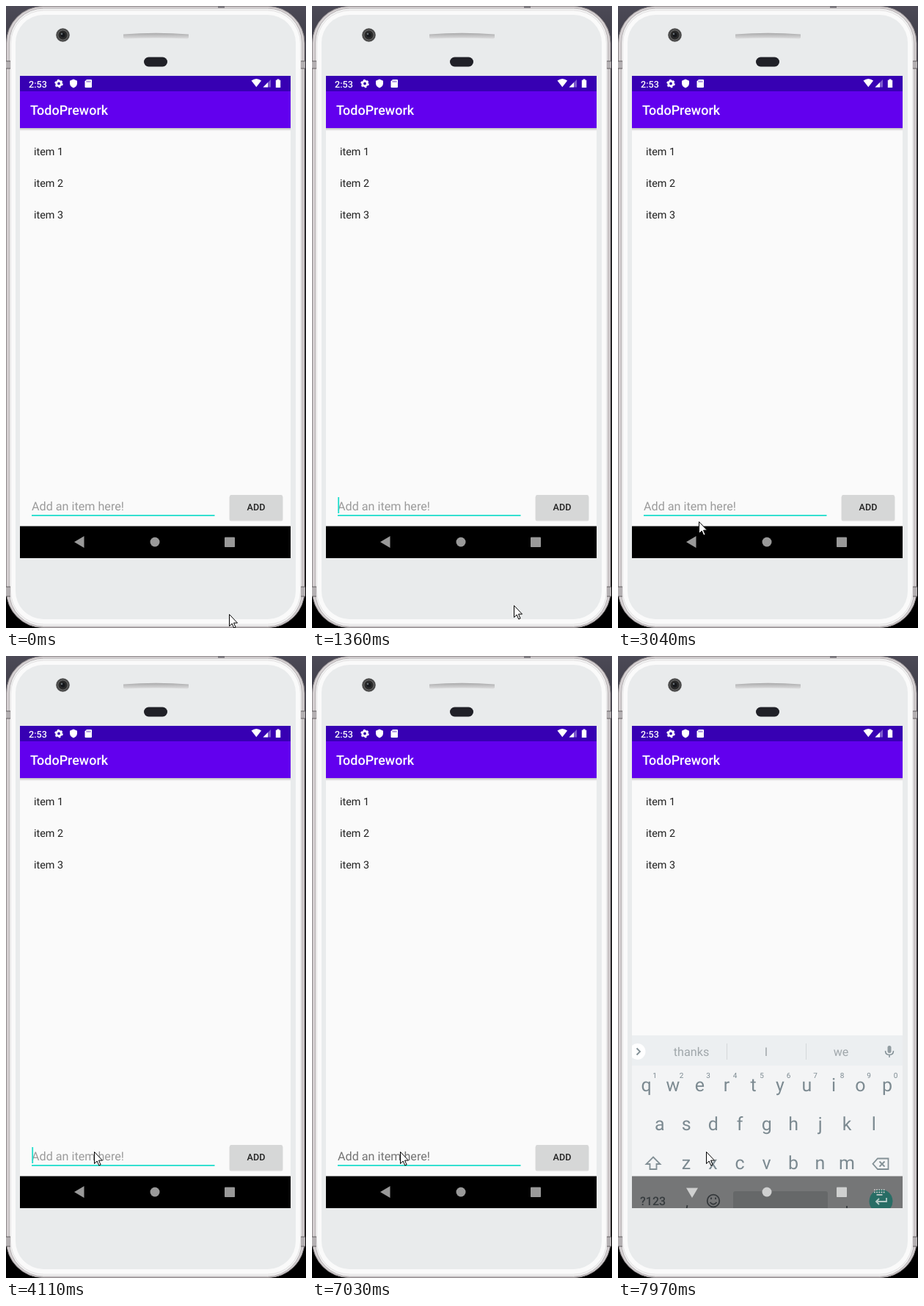
An HTML page for the animation above (8000 ms loop, 409 by 846 pixels).

```html
<!DOCTYPE html>
<html lang="en">
<head>
<meta charset="utf-8">
<title>Todo list on a phone</title>
<style>
  html, body { margin: 0; width: 100%; height: 100%; overflow: hidden; background: #000; }
  svg { display: block; width: 409px; height: 846px; font-family: Roboto, sans-serif; }
  text { text-rendering: geometricPrecision; }
  .mid { text-anchor: middle; }
  .medium { font-weight: 500; }
  .line { fill: none; stroke: #839096; stroke-width: 1.8; }
</style>
</head>
<body>
<svg viewBox="0 0 409 846" xmlns="http://www.w3.org/2000/svg">
  <defs>
    <linearGradient id="backdrop" x2="0" y2="1">
      <stop offset="0" stop-color="#4c4a56"/>
      <stop offset=".08" stop-color="#3a3943"/>
      <stop offset=".2" stop-color="#141418"/>
      <stop offset="1" stop-color="#000"/>
    </linearGradient>
    <linearGradient id="drop" x2="0" y2="1">
      <stop offset="0" stop-color="#000" stop-opacity=".24"/>
      <stop offset="1" stop-color="#000" stop-opacity="0"/>
    </linearGradient>
    <linearGradient id="grill" x2="0" y2="1">
      <stop offset="0" stop-color="#a9a9aa"/>
      <stop offset=".45" stop-color="#c2c2c3"/>
      <stop offset="1" stop-color="#dededf"/>
    </linearGradient>
    <clipPath id="screen"><rect x="19" y="95" width="369" height="656"/></clipPath>
  </defs>

  <rect width="409" height="846" fill="url(#backdrop)"/>

  <!-- phone body -->
  <rect x=".5" y=".5" width="406.500" height="845" rx="50" fill="#d5d0d2" stroke="#8f8a8c"/>
  <rect x="289" width="9" height="3" fill="#77747a"/>
  <rect x="4.500" y="3" width="399" height="841" rx="47" fill="#f1f1f1" stroke="#b5b0b2"/>
  <rect x="6.500" y="6" width="395" height="835" rx="45" fill="#fafafa" stroke="#e4e2e3"/>
  <rect x="13" y="12" width="382" height="822" rx="38" fill="#e9ebec"/>
  <g fill="#b4b0b2">
    <path d="M0 75h6v10H0zM402 75h6v10h-6zM0 790h6v13H0zM402 790h6v13h-6z"/>
    <path d="M0 75h6M0 85h6M402 75h6M402 85h6M0 790h6M0 803h6M402 790h6M402 803h6" stroke="#625e60"/>
  </g>

  <circle cx="77.500" cy="39.500" r="9.300" fill="#4b4b4b"/>
  <circle cx="77.500" cy="39.500" r="6.500" fill="#292929" stroke="#737373" stroke-width=".8"/>
  <circle cx="77.500" cy="39.500" r="3" fill="#15171b"/>
  <circle cx="76" cy="38" r="1.200" fill="#6c7479"/>
  <path d="M160 38.500q44.500-3.500 89 0v4q0 2-3 2-41.500-2-83 0-3 0-3-2z" fill="url(#grill)"/>
  <rect x="188" y="69.500" width="32" height="13" rx="6.500" fill="#202027"/>

  <g clip-path="url(#screen)">
    <rect x="19" y="95" width="369" height="656" fill="#fafafa"/>
    <rect x="19" y="166" width="369" height="4" fill="url(#drop)"/>
    <rect x="19" y="116" width="369" height="50" fill="#6200ee"/>
    <rect x="19" y="95" width="369" height="21" fill="#3700b3"/>

    <!-- status bar -->
    <g fill="#fff">
      <text class="medium" x="31" y="110.500" font-size="12.600">2:53</text>
      <circle cx="72" cy="105.500" r="3.300" fill="none" stroke="#fff" stroke-width="2.800"/>
      <circle cx="72" cy="105.500" r="4.900" fill="none" stroke="#fff" stroke-width="1.800" stroke-dasharray="2.566"/>
      <path d="M92 99.500l5 2.200v3.300q0 4.500-5 6.500-5-2-5-6.500v-3.300z"/>
      <path d="M110 100h6q1 0 1 1v9q0 1-1 1h-7.500q-1 0-1-1v-7.500z"/>
      <path d="M334.500 101.500q6.800-5 13.600 0l-6.800 8.700z"/>
      <path d="M361 100v10.500h-10.500z" opacity=".35"/>
      <path d="M357 104v6.500h-6.500z"/>
      <path d="M369.500 99.500h3v1.200h1.700v10.300h-6.400v-10.300h1.700z"/>
    </g>
    <path d="M110.500 101.500v2.300M112.500 101.500v2.300M114.500 101.500v2.300" stroke="#3700b3" stroke-width=".8"/>

    <text class="medium" x="33" y="148" font-size="17.960" fill="#fff">TodoPrework</text>
    <g font-size="14.370" fill="#212121">
      <text x="38" y="202.500">item 1</text>
      <text x="38" y="245.500">item 2</text>
      <text x="38" y="288.500">item 3</text>
    </g>

    <!-- entry row -->
    <text id="hint" x="35" y="686" font-size="16.170">Add an item here!</text>
    <rect x="35" y="692" width="249.500" height="1.800" fill="#20ddcc"/>
    <rect id="caret" x="35.300" y="668" width="1.800" height="22" fill="#20ddcc"/>
    <rect x="304.500" y="666" width="73" height="34.500" rx="2.500" fill="#000" opacity=".13"/>
    <rect x="305" y="665" width="72" height="34" rx="2" fill="#d6d7d7"/>
    <text class="mid medium" x="341" y="686" font-size="12.570" fill="#212121">ADD</text>

    <rect x="19" y="707.500" width="369" height="43.500" fill="#000"/>

    <!-- keyboard -->
    <g id="keyboard">
      <rect x="19" y="516" width="369" height="41" fill="#eceff1"/>
      <rect x="19" y="557" width="369" height="151" fill="#f3f4f5"/>
      <rect x="19" y="707.500" width="369" height="43.500" fill="#757677"/>
      <circle cx="26.500" cy="538" r="11" fill="#fff"/>
      <path class="line" d="M25.500 533.500l4.500 4.500-4.500 4.500"/>
      <path d="M148.500 527v22M256.500 527v22" stroke="#d4d8da"/>
      <g class="mid" font-size="16.200" fill="#a0a7ab">
        <text x="100" y="544">thanks</text>
        <text x="202" y="544">I</text>
        <text x="304" y="544">we</text>
      </g>
      <rect x="367.500" y="530" width="5" height="10" rx="2.500" fill="#929da2"/>
      <path class="line" style="stroke-width:1.500" d="M364.500 537q0 5.500 5.500 5.500t5.500-5.500M370 542.500v3.500"/>
      <g id="keys" class="mid" fill="#7c8a91"></g>
      <path class="line" d="M48 681.500l9.500 9.500h-5v7h-9v-7h-5z"/>
      <path class="line" d="M354 683.500h14.500v14.500h-14.500l-6.500-7.250zM356.500 687.500l7 7M363.500 687.500l-7 7"/>
      <text class="medium" x="30" y="746.500" font-size="16" fill="#373c3f">?123</text>
      <g fill="none" stroke="#35393c" stroke-width="1.800">
        <circle cx="130" cy="741" r="8.300"/>
        <path d="M125.500 743q4.500 5.500 9 0M127 736.500v2.500M133 736.500v2.500"/>
        <path d="M94.500 747l-1 5M312 748v3"/>
      </g>
      <rect x="157" y="728" width="129" height="32" rx="3" fill="#666869"/>
      <circle cx="358.500" cy="741.500" r="16" fill="#286d65"/>
      <path d="M366 737v5h-14M356 738l-4 4 4 4" fill="none" stroke="#b5cbc8" stroke-width="1.800"/>
    </g>

    <!-- navigation -->
    <g id="nav">
      <path id="back" d="M93 729l13.500-8v16z"/>
      <path id="hide" d="M93 723.500h16l-8 13.500z"/>
      <circle cx="203" cy="729" r="6.500"/>
      <rect x="298" y="722.500" width="14" height="13.500" rx=".8"/>
      <g id="switcher" fill="none" stroke-width="1.700">
        <path d="M349 726h15M349 729.300h15" stroke-dasharray="1.700 1.500"/>
        <path d="M352.500 732.800h8"/>
      </g>
    </g>
  </g>

  <path id="pointer" d="M.5.5v16l3.700-3.500 2.600 6 2.300-1-2.600-5.900h5z" fill="#fff" stroke="#000"/>
</svg>

<script>
const LOOP = 8000;
const $ = id => document.getElementById(id);

// [time, x, y]
const pointerSteps = [
  [0, 304, 827], [120, 302, 826], [240, 301, 826], [390, 300, 826],
  [1100, 296, 823], [1220, 289, 820], [1360, 275, 815], [1480, 259, 810],
  [1640, 224, 799], [1780, 200, 785], [2530, 186, 774], [2650, 150, 750],
  [2770, 118, 724], [2920, 112, 712], [3040, 110, 701], [3190, 110, 689],
  [3340, 112, 683], [3460, 115, 679], [3580, 117, 676], [3700, 119, 675],
  [3840, 120, 674]
];
// The caret flips at each of these times, starting hidden.
const caretFlips = [240, 820, 1220, 1780, 2280, 2770, 3190, 3700, 4110,
  4640, 5230, 5630, 6190, 6650, 7160, 7850];
const PRESS = 7030, RELEASE = 7580, OPENING = 7850, OPEN = 7970;

function addKey(label, x, y, size) {
  const key = document.createElementNS("http://www.w3.org/2000/svg", "text");
  key.textContent = label;
  key.setAttribute("x", x);
  key.setAttribute("y", y);
  key.setAttribute("font-size", size);
  $("keys").append(key);
}

[["qwertyuiop", 38.5, 592], ["asdfghjkl", 56.7, 644.5], ["zxcvbnm", 93, 697.5]]
  .forEach(([letters, left, y], row) => [...letters].forEach((letter, i) => {
    const x = left + i * 36.5;
    addKey(letter, x, y, 25);
    if (row === 0) addKey((i + 1) % 10, x + 11.5, 573.5, 10);
  }));

const show = (id, on) => { $(id).style.display = on ? "" : "none"; };

function draw(t) {
  const [, x, y] = pointerSteps.findLast(step => step[0] <= t);
  $("pointer").setAttribute("transform", `translate(${x} ${y})`);
  show("caret", caretFlips.filter(time => time <= t).length % 2);
  $("hint").setAttribute("fill", t >= PRESS && t < RELEASE ? "#737373" : "#9b9b9b");

  const opening = t >= OPENING, open = t >= OPEN;
  show("back", !opening);
  show("hide", opening);
  show("switcher", opening);
  show("keyboard", open);
  const navColor = open ? "#cfd0d0" : "#999";
  $("nav").setAttribute("fill", navColor);
  $("switcher").setAttribute("stroke", navColor);
}

const start = performance.now();
function tick() {
  draw((performance.now() - start) % LOOP);
  requestAnimationFrame(tick);
}
tick();
</script>
</body>
</html>
```
